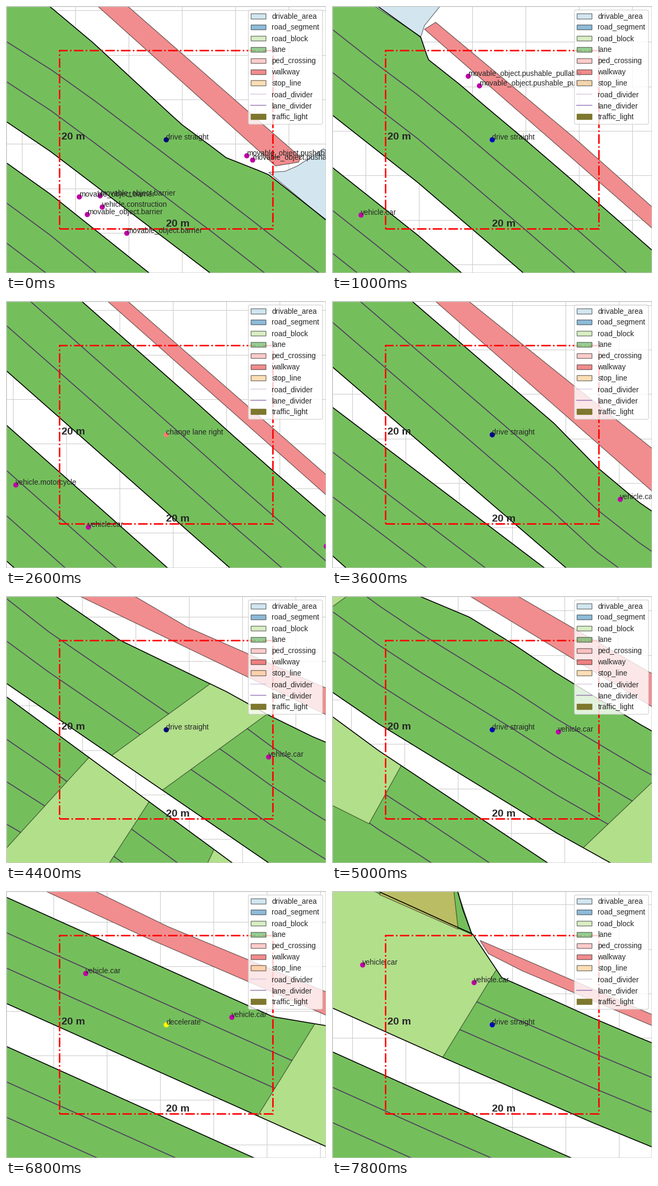
A matplotlib script that plays this animation: 600x500 px, repeating every 8000 ms.

```python
import numpy as np
import matplotlib.pyplot as plt
from matplotlib.animation import FuncAnimation
from matplotlib.lines import Line2D
from matplotlib.patches import Patch, Polygon, Rectangle

W, H, DPI, FRAMES = 600, 500, 100, 40
PX, PY = 20, 50 / 3                    # pixels per metre
LANE = 3.5                             # lane width in metres
GREEN, LIME, OLIVE = "#74bf5c", "#b2df8a", "#babd63"
PINK, WATER, DIVIDER = "#f18d8e", "#d3e6ef", "#50425c"
EDGE = (0, 0, 0, 0.5)

plt.rcParams.update({"font.family": "Liberation Sans", "font.size": 10,
                     "text.color": "0.15"})

# Camera waypoints: step number and position of the view's corner
STEP = np.array([0, 5, 13, 22, 28, 34, 39])
CAM = np.array([(0, 0), (567, 441), (1417, 1241), (2487, 2136.3),
                (3311, 2636), (4141, 3033.6), (4792, 3316.1)])
VEL = np.gradient(CAM, STEP, axis=0)


def camera(i):
    """Cubic Hermite path through the waypoints."""
    k = min(np.searchsorted(STEP, i, side="right") - 1, len(STEP) - 2)
    d = STEP[k + 1] - STEP[k]
    t = (i - STEP[k]) / d
    return ((2*t**3 - 3*t**2 + 1) * CAM[k] + (t**3 - 2*t**2 + t) * d * VEL[k]
            + (3*t**2 - 2*t**3) * CAM[k + 1] + (t**3 - t**2) * d * VEL[k + 1])


def at(k, *pts):
    """Points seen from waypoint k, in map coordinates."""
    return [tuple(CAM[k] + p) for p in pts]


fig = plt.figure(figsize=(W / DPI, H / DPI), dpi=DPI, facecolor="white")
world = fig.add_axes([0, 0, 1, 1])
world.axis("off")
hud = fig.add_axes([0, 0, 1, 1])
hud.axis("off")
hud.set(xlim=(0, W), ylim=(H, 0))


def area(pts, color, edge=EDGE, z=2, clip=None):
    patch = world.add_patch(Polygon(pts, fc=color, ec=edge, lw=1, zorder=z))
    if clip:
        patch.set_clip_path(clip)
    return patch


def line(xs, ys, color=DIVIDER, lw=1.3, z=1.5):
    world.plot(xs, ys, color=color, lw=lw, zorder=z)


# Grid, every five metres
grid = dict(color="0.8", lw=0.8, zorder=0, snap=True)
world.vlines(29 + 5 * PX * np.arange(-1, 56), -200, 4000, **grid)
world.hlines(7.7 + 5 * PY * np.arange(-2, 48), -200, 5600, **grid)

# The road follows its median; all other lines are offsets from it
spine = np.array(
    at(0, (-200, 81), (83, 272), (383, 500)) + at(1, (158, 328), (359, 500))
    + at(2, (0, 130), (420, 500)) + at(3, (0, 163), (493, 500))
    + at(4, (0, 203), (160, 292), (409, 417)) + at(5, (0, 210))
    + at(6, (207, 311), (485, 432), (700, 520)))
x = np.arange(-80, 5460, 3.0)


def median_at(xs):
    return np.interp(xs, *spine.T)


def flare(height, *corners):
    """Extra lanes: rise, plateau and fall along x."""
    return np.interp(x, corners, [0, height, height, 0])


median = median_at(x)
slope = (median_at(x + 80) - median_at(x - 80)) / 160
lane = LANE * PY * np.hypot(1, slope * PX / PY)      # lane height along y

lanes = (3 + flare(0.85, -900, -80, -79, 330)
         + flare(0.37, 412, 492, 733, 747)           # side road
         + flare(1.2, 2700, 3150, 3787, 3801)        # turning lane
         + flare(0.75, 3787, 3801, 3802, 4140)
         + flare(0.88, 4641, 4850, 5055, 5110))      # last junction
kerb = median - lanes * lane
gap = np.interp(x, [0, 567, 1720, 2487, 3311, 3600, 5500],
                [77, 98, 103, 25, 67, 79, 84])
verge = median + gap
far = verge + lane * np.interp(x, [1800, 2400], [3, 4])


def carriageway(top, bottom):
    for y in (top, bottom):
        line(x, y, "black", 1.2, 4)
    outline = np.column_stack([np.r_[x, x[::-1]], np.r_[top, bottom[::-1]]])
    return area(outline, GREEN, "none", 1)


near_road = carriageway(kerb, median)
far_road = carriageway(verge, far)
for n in (1, 2):
    line(x, median - n * lane)
    line(x, verge + n * lane)
turn = (x > 2872) & (x < 3560)
line(x[turn], (median - 3 * lane)[turn])
extra = (x > 2350) & (x < 2600)
line(x[extra], (verge + 3 * lane)[extra])


def junction(road, left, right):
    """Fill the road between two cross lines, each given by two points."""
    a, b, c, d = map(np.array, left + right)
    area([a + 0.3 * (a - b), b + 0.3 * (b - a), d + 0.3 * (d - c), c + 0.3 * (c - d)],
         LIME, clip=road)


junction(near_road, at(3, (385, 162), (195, 300)), at(3, (497, 215), (290, 365)))
junction(far_road, at(3, (155, 302), (0, 472)), at(3, (267, 386), (193, 500)))
junction(far_road, at(3, (390, 473), (340, 580)), at(3, (540, 570), (490, 660)))
junction(near_road, at(4, (250, 45), (53, 232)), at(4, (590, 268), (409, 417)))
junction(near_road, at(5, (580, 246), (472, 420)), at(6, (310, 143), (207, 311)))

# Side roads
area(at(0, (492, 311), (523, 309), (546, 299), (595, 267), (815, 385))
     + at(1, (202, 0), (173, 36), (166, 57), (80, 0)), WATER)
area(at(4, (366, 104), (397, 91), (447, 44), (553, 88), (505, 120), (478, 163)), WATER)
area(at(4, (425, 135), (478, 82), (527, 104), (478, 163)), GREEN)
area(at(4, (428, 138), (446, 115), (482, 126), (478, 163)), OLIVE)
area(at(6, (-51, -39), (25, -200), (222, -200), (235, 0), (262, 81), (78, 0)), GREEN)
area(at(6, (88, 6), (145, -60), (220, -60), (228, 0), (236, 71)), OLIVE)
line(*zip(*at(6, (222, -200), (235, 0), (245, 35), (262, 81))), "black", 1.2, 4)

# Walkways
area(at(0, (40, -118), (96, -115), (228, 0), (552, 283), (548, 292), (505, 299)), PINK)
area(at(1, (173, 43), (194, 30), (450, 243)) + at(2, (228, 0), (600, 325))
     + at(3, (241, 0), (340, 58), (600, 172)) + at(4, (398, 31), (430, 57), (392, 96))
     + at(3, (600, 222), (138, 0)) + at(2, (600, 363), (190, 0)) + at(1, (600, 416)), PINK)
area(at(4, (487, 164), (500, 122), (600, 183))
     + at(5, (167, 0), (303, 66), (640, 205), (625, 243), (265, 88), (74, 0))
     + at(4, (600, 235)), PINK)
area(at(6, (277, 92), (293, 117), (356, 149), (700, 294), (700, 274)), PINK)

# Fixed overlay
hud.add_patch(Rectangle((100, H / 2 + 10 * PY), 20 * PX, -20 * PY, fill=False,
                        ec="red", lw=2, ls="-.", zorder=2))
for px, py in ((104, 250), (300, 412.6)):
    hud.text(px, py, "20 m", size=14, weight="bold")
hud.add_patch(Rectangle((0, 0), W, H, fill=False, ec="0.8", lw=1.8, zorder=6))


def swatch(name, color):
    return Patch(fc=color, ec="black", alpha=0.5, label=name)


def stroke(name, color):
    return Line2D([], [], color=color, alpha=0.5, label=name)


hud.legend(loc="upper right", framealpha=0.8, edgecolor="0.8", handles=[
    swatch("drivable_area", "#a6cee3"), swatch("road_segment", "#1f78b4"),
    swatch("road_block", "#b2df8a"), swatch("lane", "#33a02c"),
    swatch("ped_crossing", "#fb9a99"), swatch("walkway", "#e31a1c"),
    swatch("stop_line", "#fdbf6f"), stroke("road_divider", "#cab2d6"),
    stroke("lane_divider", "#6a3d9a"), Patch(color="#7e772e", label="traffic_light")])


# Labelled objects; each path gives a view position for a step
def parked(k, px, py):
    spot = CAM[k] + (px, py)
    return lambda i: spot - camera(i)


def oncoming(step, px, py):
    return lambda i: np.array((px, py)) - (i - step) * np.array((200, 165))


def moving(steps, xs, ys):
    def path(i):
        return (np.interp(i, steps, xs, left=-99, right=-99), np.interp(i, steps, ys))
    return path


BARRIER = "movable_object.barrier"
PUSHABLE = "movable_object.pushable_pullable"
CAR = "vehicle.car"
actors = [
    (BARRIER, parked(0, 137, 357)), (BARRIER, parked(0, 176, 355)),
    (BARRIER, parked(0, 152, 390)), (BARRIER, parked(0, 226, 425)),
    ("vehicle.construction", parked(0, 180, 376)),
    (PUSHABLE, parked(0, 451, 280)), (PUSHABLE, parked(0, 462, 288)),
    (PUSHABLE, parked(1, 255, 131)), (PUSHABLE, parked(1, 276, 149)),
    ("vehicle.motorcycle", oncoming(13, 18, 344)),
    (CAR, oncoming(5, 54, 391)), (CAR, oncoming(13, 154, 423)),
    (CAR, moving(STEP[2:], [599.5, 492, 355, 423, 266], [459, 301, 206, 236, 171])),
    (CAR, moving([31, 34, 39], [5, 149, 57], [92, 154, 138])),
]


def marker(color, label=""):
    return hud.scatter([300], [250], color=color, zorder=2.5), hud.text(300, 250, label)


pins = [marker("#be00a5", name) for name, _ in actors]
ego, action = marker("blue")


def manoeuvre(i):
    if 11 <= i <= 14:
        return "change lane right", "salmon"
    if 33 <= i <= 35:
        return "decelerate", "yellow"
    blue = np.interp(i, [0, 5, 22, 28, 39], [128, 205, 128, 255, 190])
    return "drive straight", (0, 0, blue / 255)


def draw(i):
    cx, cy = camera(i) - 0.5
    world.set(xlim=(cx, cx + W), ylim=(cy + H, cy))
    for (_, path), (dot, tag) in zip(actors, pins):
        px, py = path(i)
        seen = 0 <= px <= W and 0 <= py <= H
        dot.set_offsets([(px, py)])
        tag.set_position((px, py))
        dot.set_visible(seen)
        tag.set_visible(seen)
    label, color = manoeuvre(i)
    action.set_text(label)
    ego.set_color(color)
    return []


anim = FuncAnimation(fig, draw, frames=FRAMES, interval=200, repeat=True)
plt.show()
```
